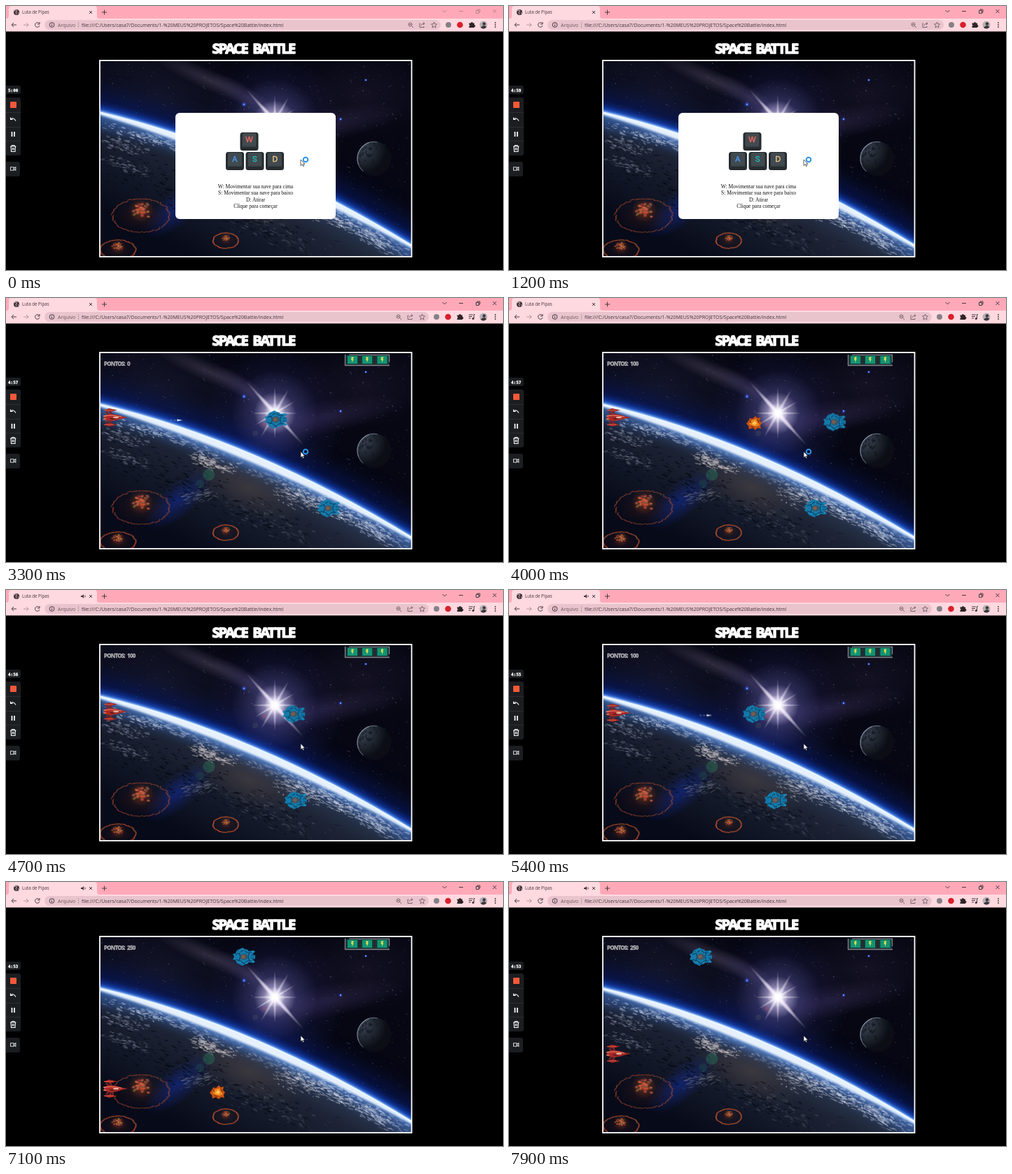
Animation, 710 px wide and 378 px high, one loop 8 s. Source, as an HTML page with a canvas:

```html
<!DOCTYPE html>
<html lang="pt-BR">
<head>
<meta charset="utf-8">
<title>Luta de Pipas</title>
<style>
html, body { margin: 0; width: 100%; height: 100%; overflow: hidden; background: #000; }
canvas { position: absolute; left: 135px; top: 79px; }
svg { position: absolute; left: 0; top: 0; }
.ui { font: 7px "Open Sans", "Noto Sans", sans-serif; fill: #43343a; }
.heading { font: 700 20px "Open Sans", sans-serif; letter-spacing: -1.9px; word-spacing: 4px; fill: #fff; stroke: #fff; stroke-width: 1.4px; stroke-linejoin: round; }
.score { font: 700 8px "Open Sans", sans-serif; letter-spacing: -.8px; word-spacing: 2px; fill: #b4b4b8; stroke: #b4b4b8; stroke-width: .3px; }
.clock { font: 700 6px "DejaVu Sans Mono", monospace; fill: #fff; stroke: #fff; stroke-width: .3px; }
.help { font: 7.54px "Liberation Serif", serif; fill: #111; text-anchor: middle; }
.key { font: 11px Inter, sans-serif; text-anchor: middle; }
.line { fill: none; stroke: #4a3a40; stroke-width: 1; }
.white { fill: none; stroke: #fff; stroke-width: 1.1; }

.game, .modal, .tools, .box, .ring, .sound, .controls { animation: 8s step-end infinite; }
.game { animation-name: show; }
.modal { animation-name: hide; }
.tools { animation-name: shift; }
.box { animation-name: shrink; }
.ring { animation-name: idle; }
.sound { animation-name: sound; }
.controls { animation-name: focus; }
@keyframes show { 0% { opacity: 0 } 21.25% { opacity: 1 } }
@keyframes hide { 21.25% { opacity: 0 } }
@keyframes shift { 21.25% { transform: translateX(-17px) } }
@keyframes shrink { 21.25% { width: 549px } }
@keyframes idle { 57.5% { opacity: 0 } }
@keyframes sound { 0% { opacity: 0 } 52.5% { opacity: 1 } }
@keyframes focus { 0% { opacity: .35 } 5% { opacity: 1 } }

.ship, .fighter, .cruiser, .shot, .blast { animation: 8s linear infinite; }
.ship { animation-name: ship; }
.fighter { animation-name: fighter; }
.cruiser { animation-name: cruiser; }
.shot { animation-name: shot; }
.blast { animation-name: blast; }
@keyframes ship {
  0%, 32.5% { transform: translate(155px, 166px) }
  32.6%, 58.7% { transform: translate(155px, 171px) }
  58.8%, 73.62% { transform: translate(155px, 176px) }
  78.75% { transform: translate(155px, 241px) }
  83.12%, 94.75% { transform: translate(155px, 296px) }
  98.75% { transform: translate(155px, 246px) }
  100% { transform: translate(155px, 230px) }
}
@keyframes fighter {
  0%, 21.25% { transform: translate(472px, 174px) }
  30% { transform: translate(434px, 174px) }
  48.11% { transform: translate(356px, 174px) }
  48.12% { transform: translate(474px, 177.5px) }
  50% { transform: translate(465px, 177.5px) }
  57.5% { transform: translate(420px, 177.5px) }
  67.5% { transform: translate(350px, 177.5px) }
  68.62% { transform: translate(342.5px, 177.5px) }
  68.63% { transform: translate(474px, 107px) }
  78.75% { transform: translate(406px, 107px) }
  100% { transform: translate(265.8px, 107px) }
}
@keyframes cruiser {
  0%, 21.25% { transform: translate(513px, 301px) }
  30% { transform: translate(490px, 301px) }
  50% { transform: translate(438px, 301px) }
  57.5% { transform: translate(418.5px, 301px) }
  67.5% { transform: translate(381px, 301px) }
  78.75% { transform: translate(339px, 301px) }
  88.62% { transform: translate(302px, 301px) }
  88.63%, 100% { transform: translate(-60px, 301px) }
}
@keyframes shot {
  0%, 35.74% { transform: translate(-60px, 175px) }
  35.75% { transform: translate(172px, 175px) }
  48.11% { transform: translate(332px, 175px) }
  48.12%, 61.69% { transform: translate(-60px, 179.5px) }
  61.7% { transform: translate(172px, 179.5px) }
  68.62% { transform: translate(302px, 179.5px) }
  68.63%, 83.11% { transform: translate(-60px, 300px) }
  83.12% { transform: translate(172px, 300px) }
  88.62% { transform: translate(276px, 300px) }
  88.63%, 100% { transform: translate(-60px, 300px) }
}
@keyframes blast {
  0%, 48.11% { transform: translate(350px, 179px); opacity: 0 }
  48.12%, 50% { transform: translate(350px, 179px); opacity: 1 }
  55.62% { transform: translate(352px, 179px) scale(1.25); opacity: 0 }
  68.62% { transform: translate(343px, 178px); opacity: 0 }
  68.63%, 70.5% { transform: translate(343px, 178px); opacity: 1 }
  76.13% { transform: translate(345px, 178px) scale(1.25); opacity: 0 }
  88.62% { transform: translate(302px, 301px); opacity: 0 }
  88.63%, 90.5% { transform: translate(302px, 301px); opacity: 1 }
  96.13%, 100% { transform: translate(304px, 301px) scale(1.25); opacity: 0 }
}
</style>
</head>
<body>
<canvas id="space" width="444" height="280"></canvas>
<svg width="710" height="378" viewBox="0 0 710 378">
  <defs>
    <g id="alien">
      <path d="M-16 -4L-12 -5Q-11 -10 -6 -11L-2 -13L1 -11Q5 -11 7 -8L14 -9L16 -7L12 -4L16 -2V3L12 4L16 7L14 9L7 8Q5 11 1 11L-2 13L-6 11Q-11 10 -12 5L-16 4L-14 0Z" fill="#147aab"/>
      <path d="M-12 -3L-6 -6L0 -10L4 -6L11 -6M-12 4L-5 6L0 10L5 6L12 6M-8 -8L-5 0L-8 8M8 -6L6 0L8 7M10 -2H15M10 2H15" fill="none" stroke="#0a4264" stroke-width="1.2"/>
      <path d="M-9 -6L-5 -7M-2 -11L1 -9M-9 7L-4 8M2 9L5 8M11 -7L14 -8M11 6L14 7" stroke="#259fc8"/>
      <ellipse rx="5.500" ry="4.500" fill="#38566a"/>
      <circle cx="-1" r="2.800" fill="#7c5c4c"/>
    </g>
    <g id="bolt">
      <rect x="-8.500" y="-6.500" width="17" height="13" fill="#113f3a"/>
      <rect x="-7" y="-5.500" width="14" height="11" fill="#129474"/>
      <path d="M-1.500 -4H2L.5 -1H1.800L-.5 4V.500H-1.800Z" fill="#dfdb4c"/>
    </g>
    <g id="cap">
      <rect x="-13" y="-13" width="26" height="26" rx="3.500" fill="#252b2f"/>
      <rect x="-10" y="-12" width="20" height="20" rx="2.500" fill="#414a4f"/>
      <path d="M-11 10L-9 7H9L11 10" fill="none" stroke="#353d41"/>
    </g>
  </defs>

  <!-- browser window -->
  <g class="ui">
    <rect width="710" height="18" fill="#ffa9b8"/>
    <path d="M1 18Q4 18 4 14V4Q4 0 8 0H126Q130 0 130 4V14Q130 18 133 18Z" fill="#ffd9e0"/>
    <rect y="18" width="710" height="18.500" fill="#ffd9e0"/>
    <circle cx="15" cy="9" r="4" fill="#3b3035"/>
    <path d="M12 7Q14 5 16 7L14 9L15 12M17 9L18 11" fill="none" stroke="#ffd9e0" stroke-width=".8"/>
    <text x="23" y="11.300" font-size="6.200">Luta de Pipas</text>
    <path class="line" d="M119 7L123 11M123 7L119 11M137 9H144M140.500 5.500V12.500"/>
    <g class="sound"><path d="M107 8H109L111 6V12L109 10H107Z"/><path class="line" d="M112.500 7.500Q114 9 112.500 10.500"/></g>
    <g class="controls">
      <path class="line" d="M623.500 6L626.500 9L629.500 6M647 7.500H653M671.500 6.500H675.500V10.500H671.500ZM673 6.500V5H677V9H675.500M695.500 5L700.500 10M700.500 5L695.500 10"/>
    </g>
    <path class="line" d="M15 27H8M11 24L8 27L11 30"/>
    <path class="line" opacity=".4" d="M25 27H32M29 24L32 27L29 30"/>
    <path class="line" d="M47.500 25A3.300 3.300 0 1 0 48 28M48 23V26H45"/>
    <rect class="box" x="55" y="20" width="566" height="14" rx="7" fill="#e9c4cc"/>
    <circle class="line" cx="65.500" cy="27" r="3.400"/>
    <path class="line" d="M65.500 26.500V29M65.500 24.800V25.600"/>
    <text x="74" y="29.500" opacity=".75">Arquivo</text>
    <path d="M103.500 23V31" stroke="#b3939b" stroke-width=".7"/>
    <text x="108" y="29.500">file:///C:/Users/casa7/Documents/1-%20MEUS%20PROJETOS/Space%20Battle/index.html</text>
    <g class="tools">
      <g opacity=".7">
        <circle class="line" cx="577.500" cy="26.500" r="2.500"/>
        <path class="line" d="M579.500 28.500L582 31M576 26.500H579"/>
        <path class="line" d="M592 25H591V30.500H597V29M593 28Q594 25 597.500 25M596 23.500L598 25L596 27"/>
        <path class="line" d="M611.500 23L612.600 25.700L615.500 26L613.300 28L614 31L611.500 29.400L609 31L609.700 28L607.500 26L610.400 25.700Z"/>
      </g>
      <circle cx="632" cy="27" r="4" fill="#858087"/>
      <circle cx="648.500" cy="27" r="4.300" fill="#d8202c"/>
      <path d="M661.500 24.500H664A1.500 1.500 0 0 1 667 24.500H669V27A1.500 1.500 0 0 1 669 30V31H661.500V29A1.300 1.300 0 0 0 661.500 26.500Z" fill="#2e2428"/>
    </g>
    <g class="game"><path class="line" d="M661 24H667M661 26.500H666M661 29H664M668.500 29V23.500H670"/><circle cx="667.300" cy="29.500" r="1.500"/></g>
    <circle cx="682" cy="27" r="5.500" fill="#b6b0b3"/>
    <circle cx="683" cy="25.500" r="2.200" fill="#3d383d"/>
    <path d="M678 30.800Q682.500 25.500 686.500 30A5.500 5.500 0 0 1 678 30.800" fill="#3d383d"/>
    <g fill="#3b2f34"><circle cx="699" cy="24" r=".9"/><circle cx="699" cy="27" r=".9"/><circle cx="699" cy="30" r=".9"/></g>
  </g>

  <text class="heading" x="294.500" y="68">SPACE BATTLE</text>
  <rect x="134" y="78" width="445.500" height="281" fill="none" stroke="#fff" stroke-width="1.800"/>

  <!-- recorder -->
  <g fill="#1b1d20">
    <path d="M0 114H18Q21 114 21 117V123Q21 126 18 126H0Z"/>
    <path d="M0 131H18Q21 131 21 134V211Q21 214 18 214H0Z"/>
    <path d="M0 223H17Q20 223 20 226V241Q20 244 17 244H0Z"/>
  </g>
  <text class="clock" id="clock" x="3" y="122.500">5:00</text>
  <rect x="6" y="137" width="9" height="9" rx="1" fill="#f4583a"/>
  <path d="M0 152.500H21M0 173.500H21M0 193.500H21" stroke="#2c2f33"/>
  <g class="white">
    <path d="M6.500 159.500V162.500H9.500M6.500 162.500Q10.500 158.500 14 164.500"/>
    <path d="M8.500 180V187M12 180V187" stroke-width="1.700"/>
    <path d="M6 201H14.500M8.500 201V199.500H12V201M7 201L7.500 208.500H13L13.500 201M9.300 203V206.500M11.200 203V206.500"/>
    <path d="M6.500 230.800H11V235.200H6.500ZM11 232.500L13.800 230.800V235.200L11 233.500" opacity=".8"/>
  </g>

  <!-- game -->
  <g class="game">
    <text class="score" x="140" y="97.200">PONTOS: <tspan id="score">0</tspan></text>
    <rect x="485" y="81.500" width="62.500" height="14.500" fill="#272a31"/>
    <path d="M484.500 81V96.500H548M490 81.500H547.500V92" fill="none" stroke="#7f8389" stroke-width="1.300"/>
    <use href="#bolt" x="495" y="88.500"/><use href="#bolt" x="516" y="88.500"/><use href="#bolt" x="537.500" y="88.500"/>
    <g class="ship">
      <path d="M-12 -8L-8 -4M-12 8L-8 4M-7 -9L-3 -3M-7 9L-3 3" stroke="#70272a" stroke-width="2.500"/>
      <path d="M-16 -10L-8 -13L4 -10.500L-6 -8ZM-16 10L-8 13L4 10.500L-6 8Z" fill="#a32520"/>
      <path d="M-15 -10.300H-2M-15 10.300H-2" stroke="#dc6a56" stroke-width=".8"/>
      <path d="M-15 -3L-7 -5L3 -4L11 -1.500L19 0L11 1.500L3 4L-7 5L-15 3Z" fill="#ab2b26"/>
      <path d="M-12 -2.500L-5 -3L10 -1" fill="none" stroke="#f08a70"/>
      <path d="M-8 1H7L-4 3Z" fill="#651719"/>
      <ellipse cx="2" rx="4" ry="1.300" fill="#e6b6a4"/>
      <path d="M-16 -2H-12M-16 2H-12" stroke="#f5b08a"/>
    </g>
    <g class="shot">
      <path d="M-9 0H-6M-4 0H-1" stroke="#6f86c8"/>
      <path d="M1 -1.500L9 0L1 1.500Z" fill="#d5e0f8"/>
    </g>
    <use class="fighter" href="#alien"/>
    <use class="cruiser" href="#alien"/>
    <g class="blast">
      <path d="M-11 1L-8 -3L-6 -7L-2 -6L2 -10L5 -7L9 -8L8 -3L11 0L9 4L10 8L5 7L2 10L-2 7L-7 9L-8 4Z" fill="#c8520f"/>
      <path d="M-7 1L-3 -4L3 -6L5 -1L8 3L3 5L-2 4Z" fill="#f08c21"/>
      <path d="M-3 1L1 -3L4 0L1 3Z" fill="#ffc859"/>
      <path d="M-6 -3L-4 0M5 -5L7 -1M-4 5L0 6" stroke="#6b2508"/>
    </g>
  </g>

  <g class="modal">
    <rect x="242" y="153" width="229" height="152" rx="6" fill="#fff"/>
    <use href="#cap" x="347.500" y="194"/><use href="#cap" x="327" y="222"/><use href="#cap" x="355.500" y="222"/><use href="#cap" x="384" y="222"/>
    <g class="key" stroke-width=".4">
      <text x="347.300" y="195" fill="#f0685e" stroke="#f0685e">W</text>
      <text x="326.700" y="223" fill="#4b93ea" stroke="#4b93ea">A</text>
      <text x="355.300" y="223" fill="#22b9b6" stroke="#22b9b6">S</text>
      <text x="384.300" y="223" fill="#f3c583" stroke="#f3c583">D</text>
    </g>
    <g class="help">
      <text x="356.500" y="261">W: Movimentar sua nave para cima</text>
      <text x="356.500" y="270.300">S: Movimentar sua nave para baixo</text>
      <text x="356.500" y="279.700">D: Atirar</text>
      <text x="356.500" y="289">Clique para começar</text>
    </g>
  </g>
  <path d="M421 220V228.500L423 226.700L424.400 229.600L425.800 229L424.500 226.200H427Z" fill="#fff" stroke="#222" stroke-width=".7"/>
  <circle class="ring" cx="428" cy="220" r="3.300" fill="none" stroke="#2b93ea" stroke-width="2"/>
</svg>

<script>
const c = document.getElementById('space').getContext('2d');
let seed = 7;
const rnd = () => (seed = seed * 16807 % 2147483647) / 2147483647;
const spread = () => rnd() + rnd() - 1;
const horizon = x => {
  const t = (x - 135) / 444;
  return 152 * (1 - t) ** 2 + 410 * t * (1 - t) + 342 * t * t;
};

function glow(x, y, r, color, sx = 1, sy = 1, turn = 0) {
  c.save();
  c.translate(x, y);
  c.rotate(turn);
  c.scale(sx, sy);
  const g = c.createRadialGradient(0, 0, 0, 0, 0, r);
  g.addColorStop(0, `rgba(${color})`);
  g.addColorStop(1, `rgba(${color.replace(/[^,]+$/, '0')})`);
  c.fillStyle = g;
  c.fillRect(-r, -r, 2 * r, 2 * r);
  c.restore();
}

function dot(x, y, rx, ry, fill, turn = 0) {
  c.fillStyle = fill;
  c.beginPath();
  c.ellipse(x, y, rx, ry, turn, 0, 7);
  c.fill();
}

function rim(width, color, blur, dy = 0) {
  c.save();
  c.filter = `blur(${blur}px)`;
  c.strokeStyle = color;
  c.lineWidth = width;
  c.beginPath();
  c.moveTo(95, 143 + dy);
  c.lineTo(135, 152 + dy);
  c.quadraticCurveTo(357, 205 + dy, 579, 342 + dy);
  c.lineTo(619, 367 + dy);
  c.stroke();
  c.restore();
}

// Bright air below the horizon, thickest in the middle
function haze(depth, color, blur) {
  c.save();
  c.filter = `blur(${blur}px)`;
  c.fillStyle = color;
  c.beginPath();
  c.moveTo(130, 150);
  c.quadraticCurveTo(357, 204, 584, 345);
  c.lineTo(584, 349);
  c.quadraticCurveTo(357, 206 + 2 * depth, 130, 154);
  c.fill();
  c.restore();
}

// Streaks of cloud scattered around a point, aligned with the horizon
function clouds(x, y, w, h, count, tone, turn = .45, strength = .4) {
  for (let i = 0; i < count; i++) {
    const a = spread() * w, b = spread() * h;
    dot(x + a * Math.cos(turn) - b * Math.sin(turn), y + a * Math.sin(turn) + b * Math.cos(turn),
      .8 + rnd() * 4, .4 + rnd() * .9, `rgba(${tone},${.1 + rnd() * strength})`, turn + spread() * .5);
  }
}

function crater(x, y, rx, ry) {
  glow(x, y, rx, '70,30,20,.4', 1, ry / rx);
  for (let i = 0; i < 90; i++) {
    const a = i / 90 * 6.28, k = 1 + spread() * .05;
    dot(x + rx * k * Math.cos(a), y + ry * k * Math.sin(a), 1.6, .8,
      `rgba(${150 + rnd() * 70},${65 + rnd() * 30},45,.5)`, Math.atan2(ry * Math.cos(a), -rx * Math.sin(a)));
  }
  const s = rx / 41;
  glow(x, y - 8 * s, 18 * s, '170,65,35,.5');
  for (let i = 0; i < 45; i++)
    dot(x + spread() * 14 * s, y - 8 * s + spread() * 10 * s, 2.2 * s, 1.6 * s,
      `rgba(${130 + rnd() * 110},${60 + rnd() * 70},${45 + rnd() * 30},.6)`);
}

function sky() {
  c.fillStyle = '#060713';
  c.fillRect(135, 79, 444, 280);
  glow(220, 125, 150, '22,24,46,.8', 1, .5, .3);
  glow(295, 108, 95, '84,74,98,.5', 1, .16, .42);
  glow(345, 132, 60, '70,62,96,.45', 1, .25, .6);
  glow(460, 170, 110, '58,46,88,.55', 1, .22, -.2);
  glow(510, 125, 100, '34,28,50,.5', 1, .6);
  glow(384, 170, 100, '40,42,110,.55');
  for (let i = 0; i < 1000; i++) {
    const r = .35 + rnd() ** 4 * .45;
    dot(135 + rnd() * 444, 79 + rnd() * 240, r, r, `rgba(185,180,205,${.1 + rnd() * .4})`);
  }
  for (const [x, y, r] of [[340, 141, 4], [478, 162, 3], [514, 106, 2.5]]) {
    glow(x, y, r, '40,90,255,.95');
    dot(x, y, .9, .9, '#86b4ff');
  }
}

function planet() {
  dot(526, 218.5, 24.5, 24.5, '#0b0e15');
  c.save();
  c.beginPath();
  c.arc(526, 218.5, 24.5, 0, 7);
  c.clip();
  glow(509, 205, 34, '72,82,98,.8');
  for (let i = 0; i < 40; i++)
    dot(514 + spread() * 18, 212 + spread() * 20, 2.5, 1.2, 'rgba(12,15,24,.35)', rnd() * 3);
  c.restore();
  c.lineCap = 'round';
  c.lineWidth = 1.1;
  for (const [from, to] of [[2.3, 4.9], [2.8, 4.4]]) {
    c.strokeStyle = 'rgba(165,180,205,.45)';
    c.beginPath();
    c.arc(526, 218.5, 24, from, to);
    c.stroke();
  }
}

function ground() {
  c.save();
  c.beginPath();
  c.moveTo(135, 359);
  for (let x = 135; x <= 579; x += 6) c.lineTo(x, horizon(x));
  c.lineTo(579, 359);
  c.clip();
  const g = c.createLinearGradient(370, 220, 290, 370);
  g.addColorStop(0, '#344565');
  g.addColorStop(.35, '#1d2435');
  g.addColorStop(1, '#070a19');
  c.fillStyle = g;
  c.fillRect(135, 79, 444, 280);
  glow(345, 272, 85, '82,70,68,.55', 1, .45, .4);
  glow(245, 290, 60, '18,40,135,.7', 1, .4, -.7);
  rim(26, 'rgba(60,110,200,.5)', 7, 10);
  clouds(235, 255, 110, 34, 190, '4,6,14', .35, .6);
  clouds(360, 315, 120, 32, 170, '6,8,16', .4, .5);
  clouds(205, 190, 75, 8, 130, '175,188,212', .3, .5);
  clouds(170, 200, 35, 12, 80, '130,140,165', .35);
  clouds(295, 237, 36, 11, 150, '205,198,200', .35, .5);
  clouds(172, 230, 40, 11, 70, '125,130,150', .35);
  clouds(270, 212, 60, 8, 80, '160,175,205', .38);
  clouds(360, 250, 75, 10, 90, '150,160,182');
  clouds(470, 302, 95, 15, 330, '200,206,222', .47, .55);
  clouds(415, 285, 45, 18, 140, '180,182,195', .35);
  clouds(535, 338, 55, 14, 150, '170,182,208', .5, .5);
  clouds(275, 283, 32, 12, 70, '105,110,130', -.2);
  clouds(380, 325, 120, 24, 90, '85,88,104');
  crater(193, 300, 41, 24);
  crater(314, 336, 18, 11);
  crater(160, 349, 25, 14);
  c.restore();
}

function star() {
  glow(384, 165, 62, '115,108,180,.5');
  for (const [turn, length, width] of [[.84, 62, .05], [.84, 40, .12], [-1.05, 40, .07], [0, 34, .06], [1.57, 38, .06], [2.6, 34, .06]])
    glow(384, 165, length, '255,245,255,.9', 1, width, turn);
  glow(384, 165, 30, '235,225,255,.85');
  glow(384, 165, 15, '255,255,255,1');
  glow(384, 165, 9, '255,255,255,1');
}

c.translate(-135, -79);
sky();
rim(40, 'rgba(8,32,130,.5)', 14, -8);
rim(14, 'rgba(20,76,215,.75)', 5, -2);
planet();
ground();
rim(6, 'rgba(70,150,255,.9)', 2.2, 1);
haze(14, 'rgba(120,175,250,.6)', 4);
haze(9, 'rgba(240,247,255,.95)', 1.5);
rim(2.8, 'rgba(235,246,255,.95)', .7, 1);
star();
dot(290, 253, 8.5, 8.5, 'rgba(45,125,95,.4)');
dot(277, 266, 6, 6, 'rgba(35,95,85,.28)');
dot(369, 181, 3, 3, 'rgba(190,70,110,.3)');
dot(356, 194, 4, 4, 'rgba(80,100,90,.25)');

const clock = document.getElementById('clock');
const score = document.getElementById('score');
const hits = [[7090, 250], [5490, 200], [3850, 100], [0, 0]];

function tick(now) {
  const t = Math.max(0, now) % 8000;
  const left = 300 - Math.max(0, Math.floor((t - 100) / 1000));
  clock.textContent = `${Math.floor(left / 60)}:${String(left % 60).padStart(2, '0')}`;
  score.textContent = hits.find(h => t >= h[0])[1];
  requestAnimationFrame(tick);
}
requestAnimationFrame(tick);
</script>
</body>
</html>
```
